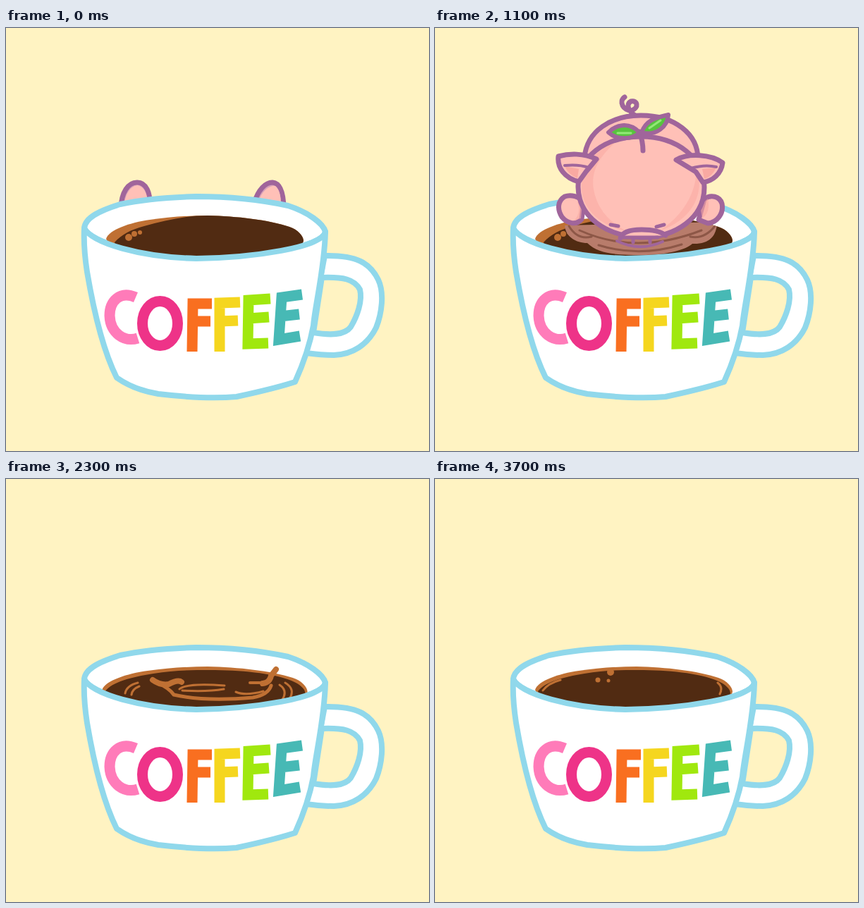
Recreate the animation shown at these times as an HTML page. Size 600 px wide and 600 px high, loop 3.8 s.

```html
<!DOCTYPE html>
<html lang="en">
<head>
<meta charset="utf-8">
<title>Coffee break</title>
<style>
  html, body { margin: 0; width: 100%; height: 100%; overflow: hidden; background: #fff3c2; }
  svg { display: block; width: 100vw; height: 100vh; }
  .line { stroke: #a0659b; stroke-width: 7; }
  .thin { stroke: #a0659b; stroke-width: 4; fill: none; }
  .skin { fill: #ffc0b7; }
  .shade { fill: #f9a9a2; stroke: none; }
  .ink { fill: #a0659b; stroke: none; }
  .leaf { fill: #58c43e; stroke: #a0659b; stroke-width: 6; }
  .glint { fill: none; stroke: #93e878; stroke-width: 3; }
  .cup { fill: #fff; stroke: #90d8eb; stroke-width: 8; }
  .dark { fill: #512b12; }
  .light { fill: #bf7033; }
  .foam { fill: none; stroke: #bf7033; }
  .letters { fill: none; stroke-width: 15; stroke-linecap: butt; stroke-linejoin: miter; }
</style>
</head>
<body>
<svg viewBox="0 0 600 600" fill="none" stroke-linecap="round" stroke-linejoin="round">
  <defs>
    <path id="surface" d="M142 299C146 286 176 276 204 272C232 268 260 266 286 266C328 267 372 272 402 282C414 286 422 295 422 302L410 335H160Z"/>
    <clipPath id="pool"><use href="#surface"/></clipPath>

    <g id="head">
      <path class="line" d="M279 122C282 106 279 90 272 80"/>
      <path class="leaf" d="M272 80C260 74 236 78 225 95C242 104 262 99 272 80Z"/>
      <path class="leaf" d="M273 80C285 69 300 73 318 69C315 86 300 94 283 87Z"/>
      <path class="glint" d="M238 93L246 86M252 93L262 84M286 82L308 76"/>
      <g id="ears">
        <path class="line skin" d="M228 137C206 124 184 122 164 126C163 150 168 176 181 187C187 190 194 189 202 184Z"/>
        <path class="shade" d="M177 140C194 134 212 139 222 148L200 175C184 171 179 157 177 140Z"/>
        <path class="thin" d="M180 161C184 171 189 176 198 177M178 140C194 135 208 138 218 147"/>
        <path class="line skin" d="M327 131C350 120 378 117 402 122C405 146 394 174 378 183C370 187 362 184 356 178Z"/>
        <path class="shade" d="M346 139C360 132 376 133 389 137C390 156 379 171 366 176Z"/>
        <path class="thin" d="M341 142C356 134 373 132 389 137M388 155C383 167 375 174 366 176"/>
      </g>
      <path class="line skin" d="M192 203C192 158 227 123 282 123C335 123 371 160 371 208C371 226 366 238 354 251C338 268 314 273 284 272C245 272 216 265 201 246C194 235 192 220 192 203Z"/>
      <path class="shade" d="M196 205C196 168 216 140 248 131C220 150 206 177 208 207C210 232 225 253 250 267C213 260 196 240 196 205Z" opacity=".55"/>
      <path class="shade" d="M352 160C369 184 372 217 355 243C341 260 325 266 305 268C346 250 362 205 352 160Z" opacity=".45"/>
      <path d="M273 132Q285 129 294 132" stroke="#ffe0da" stroke-width="5"/>
      <g fill="#ff9896">
        <ellipse cx="226" cy="239" rx="13" ry="6.5"/>
        <ellipse cx="338" cy="239" rx="15" ry="6.5"/>
      </g>
      <path d="M217 238L224 236M230 236H233M327 238L333 236M340 237H343" stroke="#ffd5d0" stroke-width="4"/>
      <path class="ink" d="M221 224Q226 219 234 219L235 229Q226 230 221 224ZM322 220Q332 220 341 224Q334 231 323 229Z"/>
      <ellipse class="line" cx="277.5" cy="240" rx="28" ry="21" fill="#ffa9a1"/>
      <ellipse class="ink" cx="269" cy="238" rx="4.5" ry="6" transform="rotate(15 269 238)"/>
      <ellipse class="ink" cx="286" cy="238" rx="4.5" ry="6" transform="rotate(-15 286 238)"/>
      <circle cx="259" cy="242" r="3" fill="#ffe0da"/>
    </g>
  </defs>

  <rect width="600" height="600" fill="#fff3c2"/>

  <g id="peek" class="skin">
    <path class="line" d="M163 258C163 232 174 219 186 219C198 219 206 232 204 258" fill="#d7a0b8"/>
    <path d="M167 255C169 232 178 224 187 223C197 226 201 236 201 252Z"/>
    <path class="line" d="M352 248C358 229 368 219 378 219C389 220 394 234 394 258" fill="#d7a0b8"/>
    <path d="M357 250C362 230 374 223 382 224C390 231 390 243 390 257Z"/>
  </g>
  <use id="rise" href="#head"/>

  <path class="cup" d="M452 323C497 322 516 333 528 357C537 376 533 405 525 425C513 449 492 463 465 464C450 464 440 463 426 461Z"/>
  <path class="cup" d="M448 354C478 353 494 356 502 371C506 387 498 409 489 424C480 436 460 436 436 432Z" style="fill:#fff3c2"/>
  <path class="cup" d="M111 284C112 268 136 258 162 250C195 243 235 240 270 239C322 239 363 244 400 252C428 261 450 277 453 289C450 311 350 326 270 327C190 322 122 305 111 284Z"/>

  <g id="coffee">
    <use href="#surface" class="light"/>
    <g id="still">
      <path class="dark" d="M154 304C164 293 177 286 196 281C225 273 255 266 286 266C328 267 372 272 402 282C414 286 422 295 422 302L410 335H160Z"/>
      <g class="light"><circle cx="174" cy="297" r="5"/><circle cx="182" cy="292" r="4"/><circle cx="190" cy="290" r="3"/></g>
    </g>
    <path id="full" class="dark" d="M146 301C156 288 181 281 212 276C240 271 264 271 288 271C330 271 374 275 400 286C412 291 419 298 419 304L408 335H160Z"/>
    <g id="specks" class="light">
      <circle cx="231" cy="285" r="3.5"/><circle cx="246" cy="286" r="2.5"/><circle cx="249" cy="274" r="5"/>
      <path class="foam" stroke-width="3" d="M401 289Q409 295 404 305M153 300Q160 290 178 285"/>
    </g>
  </g>

  <g clip-path="url(#pool)">
    <g id="glow">
      <path fill="#805345" d="M208 278C218 300 248 311 283 310C318 310 342 300 352 280L335 265H225Z"/>
      <path d="M218 289Q280 312 346 287M232 282Q286 298 335 280" stroke="#9a6b58" stroke-width="3"/>
      <path d="M205 292Q290 323 405 294" stroke="#6b3d25" stroke-width="3"/>
      <path d="M250 321Q285 315 320 320" stroke="#4d6e20" stroke-width="4"/>
      <g class="light" id="dots"></g>
    </g>
    <g id="mirror">
      <path fill="#b87c6b" d="M184 280C185 296 200 305 216 305C232 321 260 322 292 322C332 322 356 314 365 306C388 307 400 296 400 275Z"/>
      <path d="M205 287Q285 323 378 287M232 308Q290 326 350 307M190 281Q202 301 222 296M362 296Q382 300 397 281" stroke="#8d5747" stroke-width="3"/>
      <path d="M258 302Q290 318 323 303" stroke="#a0659b" stroke-width="4"/>
    </g>
    <g id="rings" class="foam"></g>
    <g id="settle" class="foam">
      <path stroke-width="5" d="M215 289Q232 297 238 306Q282 316 350 310Q372 306 376 293"/>
      <path stroke-width="3" d="M246 298Q256 289 310 293M250 300Q285 302 309 298M326 302Q340 308 365 301M169 304Q171 293 187 289M178 306Q179 298 189 294M396 289Q411 298 402 312M388 292Q400 300 392 313"/>
    </g>
  </g>
  <g id="fingers" class="foam">
    <path stroke-width="8" d="M208 285Q219 293 231 291Q244 284 249 288M364 290Q374 289 376 279L383 270"/>
    <path stroke-width="4" d="M346 289H366"/>
  </g>
  <g id="splash">
    <path class="dark" stroke="#bf7033" stroke-width="5" d="M195 311C218 294 196 254 207 233C216 228 220 240 217 254C218 273 235 285 252 279C266 266 254 210 274 193C286 188 288 208 282 231C280 263 300 282 321 277C344 270 341 243 354 225C366 219 370 232 363 246C355 270 364 294 390 309Z"/>
    <g class="light"><circle cx="240" cy="220" r="6"/><circle cx="317" cy="207" r="7"/><circle cx="385" cy="240" r="5"/><circle cx="180" cy="258" r="5"/></g>
  </g>

  <g id="sprout">
    <path class="leaf" d="M290 326C288 304 272 292 253 291C252 309 262 325 280 331ZM294 326C295 304 311 291 331 289C331 306 321 320 300 331Z"/>
    <path class="glint" d="M262 301Q275 311 284 325M322 298Q309 307 299 323"/>
  </g>

  <g id="lean">
    <use id="bob" href="#head"/>
    <path class="line skin" d="M175 246C181 233 194 236 202 243C212 250 219 262 216 271C209 279 194 280 187 273C183 266 187 261 181 258C175 255 173 250 175 246Z"/>
    <path class="line skin" d="M359 254C358 240 374 231 385 235C397 239 403 249 400 254C395 261 387 262 383 269C378 277 365 275 361 267Z"/>
    <path class="shade" d="M198 273C208 271 209 261 205 252C215 261 217 270 198 273ZM364 266C376 268 388 253 396 251C388 260 379 274 364 266Z" opacity=".6"/>
  </g>

  <g id="bow">
    <path class="line" d="M269 98C260 104 267 118 279 117C290 113 287 102 278 104C270 108 275 119 284 124" stroke-width="6"/>
    <path class="line skin" d="M212 184C215 146 250 124 292 124C340 124 373 150 373 186Z"/>
    <path class="line skin" d="M184 239C174 245 173 257 180 268C188 278 201 280 208 271L211 248C205 238 192 236 184 239ZM382 243C391 235 404 239 407 249C410 263 400 276 387 277L374 272Z"/>
    <path class="shade" d="M197 273Q208 263 202 246L209 249L207 270ZM379 270Q391 262 387 242L376 252Z" opacity=".6"/>
    <path class="line skin" d="M203 226C202 182 242 154 292 154C344 154 382 185 382 226C382 269 342 297 293 297C242 295 204 268 203 226Z"/>
    <path class="shade" d="M208 226C208 195 228 172 255 163C232 184 221 204 225 229C230 257 248 276 272 288C236 282 208 257 208 226ZM371 200C383 232 367 272 318 288C350 267 370 237 371 200Z" opacity=".55"/>
    <path class="line skin" d="M229 186C211 177 190 178 175 182C173 198 184 213 204 218L214 204ZM342 187C360 177 391 179 408 191C406 207 394 217 380 219L370 204Z"/>
    <path class="shade" d="M184 196L204 200L202 213Q189 208 184 196ZM379 200L399 198Q393 211 382 214Z"/>
    <path class="thin" d="M184 195Q204 193 218 198M363 199Q383 193 399 197"/>
    <path class="line skin" d="M263 298C266 288 280 286 293 286C311 286 322 290 327 294"/>
    <path class="line" d="M249 279L260 281M314 282L325 279M265 297H316M281 298V304M305 298V304" style="stroke-width:5"/>
    <path class="line" d="M290 147Q295 161 295 174"/>
    <path class="leaf" d="M290 148C274 132 256 138 246 148C259 160 281 158 290 148ZM293 148C300 129 315 127 331 123C330 140 313 154 293 148Z"/>
    <path class="glint" d="M259 149H278M304 142L320 131"/>
  </g>

  <path d="M111 284C122 305 190 325 270 327C350 326 450 311 453 289C452 340 438 395 436 422C430 455 420 480 410 502C385 510 355 517 327 523C292 526 250 523 216 519C192 515 174 508 157 496C139 460 125 405 115 346C111 320 110 304 111 284Z" class="cup"/>

  <g class="letters" role="img" aria-label="COFFEE">
    <path stroke="#ff7bb9" d="M184 382C161 372 147 388 147 408C148 433 168 446 187 440"/>
    <ellipse stroke="#ee3388" cx="218.5" cy="419" rx="25" ry="31.5"/>
    <path stroke="#f96f20" d="M264 459L265 391H292M264 416H290"/>
    <path stroke="#f5d61f" d="M303 459L303 390L332 389M303 416L329 415"/>
    <path stroke="#a0e80e" d="M375 384L344 386L343 448L372 447M344 412L373 410"/>
    <path stroke="#47b9b5" d="M420 378L391 382L387 442L417 437M389 409L416 406"/>
  </g>
</svg>
<script>
const NS = "http://www.w3.org/2000/svg", STEP = 100, COUNT = 38;
const $ = id => document.getElementById(id);
const show = (id, on) => { $(id).style.visibility = on ? "visible" : "hidden"; };
const drop = (id, y) => $(id).setAttribute("transform", `translate(0 ${y})`);
const scaleAt = (id, x, y, sx, sy) =>
  $(id).setAttribute("transform", `translate(${x} ${y}) scale(${sx} ${sy}) translate(${-x} ${-y})`);

function add(parent, tag, attrs) {
  const el = document.createElementNS(NS, tag);
  for (const key in attrs) el.setAttribute(key, attrs[key]);
  return parent.appendChild(el);
}

for (let i = 0; i < 14; i++)
  add($("dots"), "circle", { cx: 167 + i * 3.1, cy: 296 + 6 * Math.sin(i * 2.4), r: 1.3 + i % 3 * 0.6 });

const rings = [[48, 5], [74, 6], [101, 3]].map(([radius, width]) => ({
  radius,
  el: add($("rings"), "ellipse", { cx: 292, cy: 297, "stroke-width": width,
    "stroke-dasharray": radius > 100 ? "90 60" : "180 12" })
}));

// Each value holds for one step.
const bob = { 3: 6, 4: 0, 5: -6, 6: -12, 7: -7, 8: 3 };
const bow = { 9: -10, 10: -4, 11: 0, 12: 0, 13: 50, 14: 126 };
const splash = { 14: 0.35, 19: 0.4, 20: 0.95, 21: 0.75, 22: 0.4 };
const level = { 25: 0.92, 26: 0.72, 27: 0.5, 28: 0.32, 29: 0.28, 30: 0.26, 31: 0.28,
  32: 0.38, 33: 0.5, 34: 0.63, 35: 0.63, 36: 0.86 };

function draw(f) {
  show("peek", f < 2);
  drop("peek", f * -6);
  show("rise", f === 1 || f === 2);
  drop("rise", f === 1 ? 112 : 42);
  show("lean", f in bob);
  drop("bob", bob[f] ?? 0);
  show("bow", f in bow);
  drop("bow", bow[f] ?? 0);
  show("glow", f in bob);
  show("mirror", f > 8 && f < 13);

  const depth = level[f] ?? 1;
  const swell = f > 18 && f < 25 ? 1.04 : 1;
  scaleAt("coffee", 282, 322, swell * (0.54 + 0.46 * depth ** 0.9), depth);
  show("still", f < 14);
  show("full", f > 13);
  show("specks", f > 35);

  const age = f - 15;
  show("rings", f > 13 && f < 23);
  for (const { radius, el } of rings) {
    const r = radius + age * 7;
    el.setAttribute("rx", r);
    el.setAttribute("ry", r * 0.17);
  }
  show("settle", f === 23 || f === 24);
  show("fingers", f === 23);
  show("splash", f in splash);
  scaleAt("splash", 292, 304, 1, splash[f] ?? 1);
  show("sprout", f > 26 && f < 32);
  drop("sprout", { 27: 14, 31: 18 }[f] ?? 0);
}

const start = performance.now();
function tick() {
  draw(Math.floor((performance.now() - start) / STEP) % COUNT);
  requestAnimationFrame(tick);
}
tick();
</script>
</body>
</html>
```
